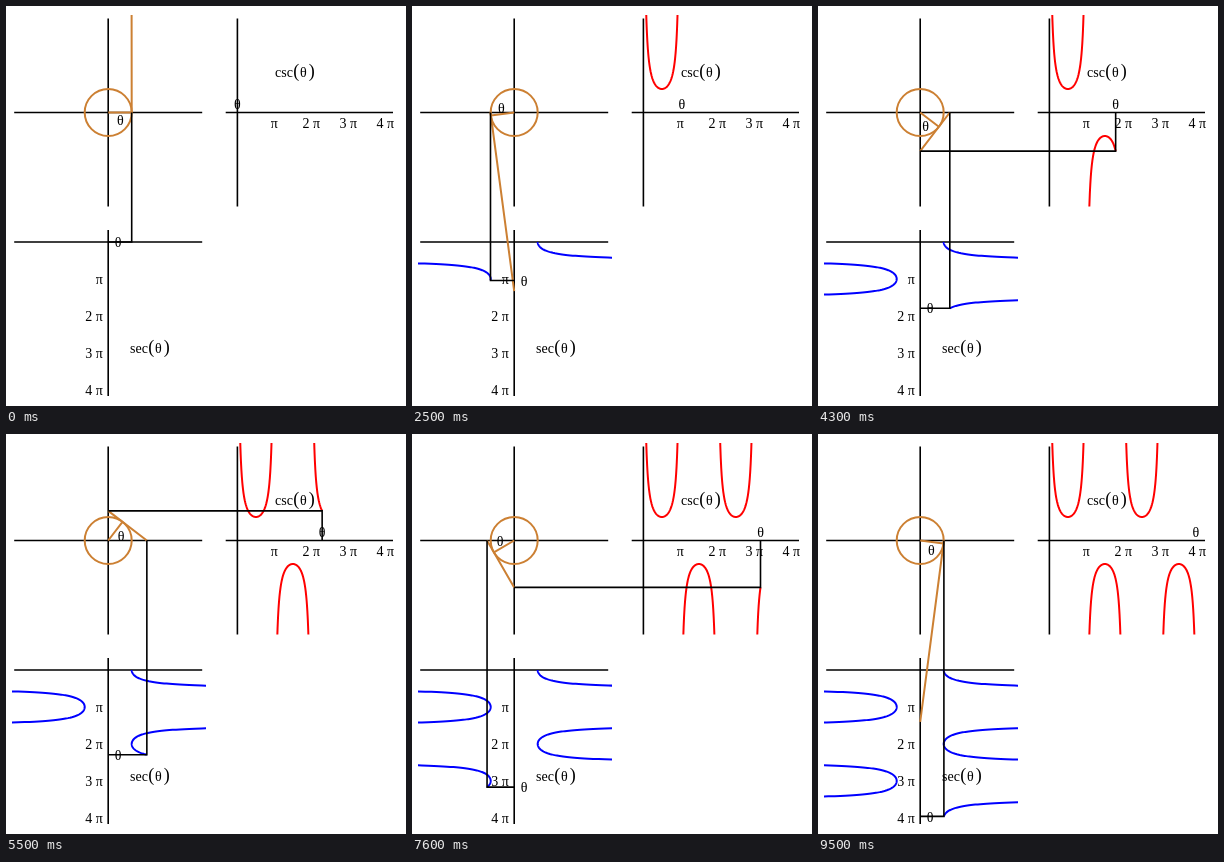
Animation of 400 by 400 pixels, one loop 9600 ms. Source, as an HTML page:

```html
<!DOCTYPE html>
<html lang="en">
<head>
<meta charset="utf-8">
<title>Secant and cosecant</title>
<style>
  html, body { margin: 0; width: 100%; height: 100%; overflow: hidden; background: #fff; }
  svg { display: block; width: 100vw; height: 100vh; }
  text { font: 14px "Liberation Serif", "Times New Roman", serif; fill: #000; }
  .paren { font-size: 18px; }
  path, circle { fill: none; stroke-width: 2; }
  .black { stroke: #000; stroke-width: 1.6; }
  .orange { stroke: #cc8033; }
</style>
</head>
<body>
<svg viewBox="0 0 400 400">
  <defs>
    <clipPath id="all"><rect x="6" y="9" width="382" height="382"/></clipPath>
    <clipPath id="secBox"><rect x="6" y="220" width="194" height="171"/></clipPath>
    <clipPath id="cscBox"><rect x="220" y="9" width="168" height="191.5"/></clipPath>
  </defs>
  <path class="black" d="M8.2 106.5H196.2M102.2 12.5V200.5M219.7 106.5H387M231.4 12.5V200.5M8.2 236H196.2M102.2 224V390"/>
  <g clip-path="url(#cscBox)"><path id="csc" stroke="#f00"/></g>
  <g clip-path="url(#secBox)"><path id="sec" stroke="#00f"/></g>
  <g clip-path="url(#all)">
    <circle class="orange" cx="102.2" cy="106.5" r="23.5"/>
    <path id="tri" class="orange"/>
  </g>
  <path id="guides" class="black"/>
  <g id="labels"></g>
</svg>
<script>
const CX = 102.2, CY = 106.5, R = 23.5;   // unit circle
const SY = 236, GX = 231.4;               // start of each angle axis
const RAD = 11.77;                        // pixels per radian
const STEPS = 96, STEP_MS = 100, LIMIT = 5;

const $ = id => document.getElementById(id);
const sec = a => 1 / Math.cos(a);
const csc = a => 1 / Math.sin(a);
const px = v => CX + R * v;
const py = v => CY - R * v;
const n = v => v.toFixed(2);

function label(str, x, y, anchor = "middle", cls = "") {
  const el = document.createElementNS("http://www.w3.org/2000/svg", "text");
  el.textContent = str;
  el.setAttribute("text-anchor", anchor);
  if (cls) el.setAttribute("class", cls);
  $("labels").append(el);
  return place(el, x, y);
}

function place(el, x, y) {
  el.setAttribute("x", n(x));
  el.setAttribute("y", n(y));
  return el;
}

function funcName(name, x, y) {
  label(name, x, y, "start");
  label("(", x + 18.3, y, "start", "paren");
  label("θ", x + 25, y, "start");
  label(")", x + 33.8, y, "start", "paren");
}

for (let i = 1; i <= 4; i++) {
  const str = i > 1 ? i + " π" : "π";
  label(str, GX + i * Math.PI * RAD, 122.3);
  label(str, 96.8, SY + i * Math.PI * RAD + 4.8, "end");
}
funcName("csc", 269, 71);
funcName("sec", 124, 347);

const [arcMark, cscMark, secMark] = [0, 1, 2].map(() => label("θ", 0, 0));

// Path of f from 0 to end, broken at the poles
function curve(f, end, toPoint) {
  const count = Math.ceil(end / 0.02);
  let d = "", pen = false;
  for (let i = 0; i <= count; i++) {
    const a = end * i / count, v = f(a);
    if (Math.abs(v) > 9) { pen = false; continue; }
    const [x, y] = toPoint(a, v);
    d += (pen ? "L" : "M") + n(x) + " " + n(y);
    pen = true;
  }
  return d;
}

function draw(ms) {
  const k = Math.floor(ms / STEP_MS) % STEPS;
  const a = k * 4 * Math.PI / STEPS + 0.001;   // just past each pole
  const s = sec(a), c = csc(a);
  const sx = px(s), cy = py(c), ax = GX + a * RAD, ay = SY + a * RAD;

  $("csc").setAttribute("d", curve(csc, a, (t, v) => [GX + t * RAD, py(v)]));
  $("sec").setAttribute("d", curve(sec, a, (t, v) => [px(v), SY + t * RAD]));

  $("tri").setAttribute("d",
    `M${CX} ${CY}L${n(px(Math.cos(a)))} ${n(py(Math.sin(a)))}M${n(sx)} ${CY}L${CX} ${n(cy)}`);

  let d = "";
  if (Math.abs(s) < LIMIT) d += `M${n(sx)} ${CY}V${n(ay)}H${CX}`;
  if (Math.abs(c) < LIMIT) d += `M${CX} ${n(cy)}H${n(ax)}V${CY}`;
  $("guides").setAttribute("d", d);

  const lag = a - Math.PI / 6;
  place(arcMark, CX + 14 * Math.cos(lag), CY - 14 * Math.sin(lag) + 5.5);
  place(cscMark, ax, 103.2);
  place(secMark, 112, ay + 5.2);
}

function tick() {
  draw(performance.now() - start);
  requestAnimationFrame(tick);
}
const start = performance.now();
tick();
</script>
</body>
</html>
```
